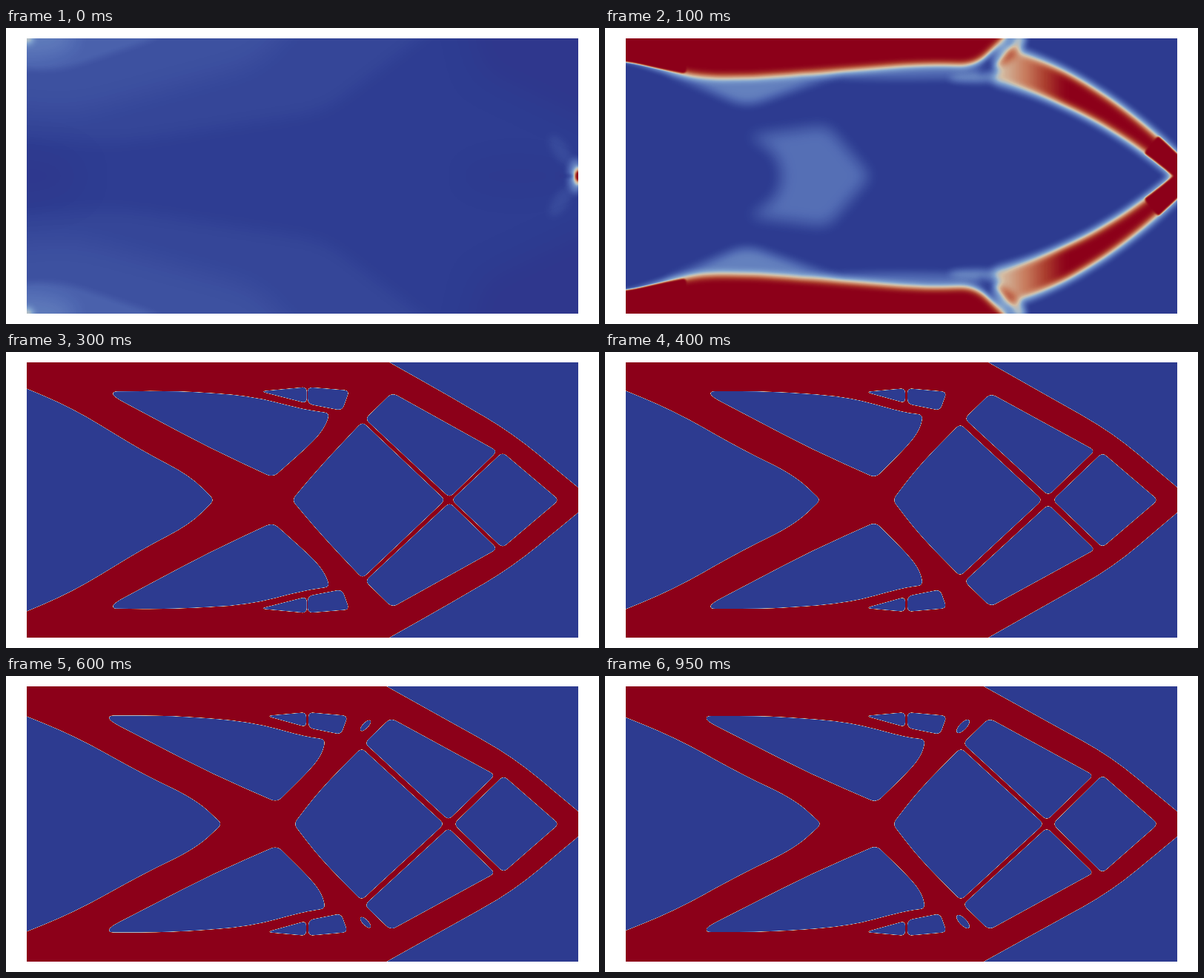
Animation of 800 by 400 pixels, one loop 1000 ms. Source, as an HTML page with a canvas:

```html
<!DOCTYPE html>
<html>
<head>
<meta charset="utf-8">
<style>
html, body { margin: 0; width: 100%; height: 100%; overflow: hidden; background: #fff; }
canvas { display: block; }
</style>
</head>
<body>
<canvas id="view" width="800" height="400"></canvas>
<script>
// A grey density field is drawn, softened and then coloured through a palette.
const view = document.getElementById('view').getContext('2d');
const fieldCanvas = document.createElement('canvas');
fieldCanvas.width = 800;
fieldCanvas.height = 400;
const field = fieldCanvas.getContext('2d', { willReadFrequently: true });
const SOLID = '#fff', VOID = '#080808', DARK = '#000';

const mix = (a, b, k) => a + (b - a) * k;
const clamp = v => Math.min(1, Math.max(0, v));
const easeOut = v => 1 - (1 - clamp(v)) ** 2;

const stops = [
  [0, 47, 54, 140], [.04, 45, 60, 145], [.2, 80, 105, 178], [.4, 125, 158, 205],
  [.5, 172, 188, 200], [.6, 212, 190, 165], [.75, 200, 125, 95], [.88, 170, 60, 45], [1, 140, 0, 25]
];
const palette = Array.from({ length: 256 }, (_, i) => {
  const v = i / 255;
  const n = Math.max(1, stops.findIndex(s => s[0] >= v));
  const a = stops[n - 1], b = stops[n], k = (v - a[0]) / (b[0] - a[0]);
  return [1, 2, 3].map(c => mix(a[c], b[c], k));
});

// Corners of the holes in the upper half: early, settled, and the slow drift afterwards.
const hole = (early, settled, drift = () => [0, 0]) => ({ early, settled, drift });
const leftNotch = hole(
  [[10,33], [82,65], [180,139], [228,170], [251,200]],
  [[10,45], [92,79], [187,133], [255,166], [291,200]],
  (x, y) => [1, (200 - y) / 37]);
const triangle = hole(
  [[149,54], [225,51], [322,51], [400,66], [460,76], [448,88], [432,106], [345,168], [262,124], [152,62]],
  [[142,53], [225,53], [330,61], [400,81], [429,85], [425,104], [410,125], [365,170], [280,132], [143,60]],
  x => [1 + (x - 360) / 33, 1]);
const slots = [
  hole([[318,51], [408,42], [408,70]], [[352,54], [405,49], [405,69]]),
  hole([[404,43], [470,46], [458,79], [404,70]], [[408,49], [461,54], [452,79], [408,70]])
];
const diamond = hole(
  [[379,200], [427,155], [486,86], [600,200]],
  [[388,200], [424,153], [479,97], [590,200]],
  x => [(x - 388) / 100, 0]);
const quad = hole(
  [[483,92], [523,52], [668,137], [600,205]],
  [[485,90], [520,56], [661,133], [598,194]],
  () => [-2, 1]);
const kite = hole(
  [[592,200], [666,134], [746,200]],
  [[604,200], [671,136], [746,200]],
  (x, y) => [0, (y - 200) / 30]);
const corner = hole(
  [[505,7], [600,59], [680,113], [772,184], [790,198], [790,5]],
  [[505,7], [600,61], [685,109], [772,183], [790,198], [790,5]],
  x => [Math.min(0, (x - 772) / 42), 0]);
const holes = [leftNotch, triangle, ...slots, diamond, quad, kite, corner];

function brush(color, alpha, blur) {
  field.fillStyle = field.strokeStyle = color;
  field.globalAlpha = alpha;
  field.filter = blur ? `blur(${blur}px)` : 'none';
}

// Rounded outline: the straighter the bend, the longer its curve.
function trace(pts) {
  const n = pts.length;
  pts.forEach((p, i) => {
    const [a, b] = [pts[(i + n - 1) % n], pts[(i + 1) % n]].map(q => [q[0] - p[0], q[1] - p[1]]);
    const la = Math.hypot(...a), lb = Math.hypot(...b);
    const straight = Math.max(0, -(a[0] * b[0] + a[1] * b[1]) / (la * lb));
    const cut = 7 + 40 * straight ** 3;
    const ka = Math.min(cut / la, .5), kb = Math.min(cut / lb, .5);
    field.lineTo(p[0] + a[0] * ka, p[1] + a[1] * ka);
    field.quadraticCurveTo(...p, p[0] + b[0] * kb, p[1] + b[1] * kb);
  });
  field.closePath();
}

// Outlines ending on the axis join their reflection, others get a twin.
function shape(pts, color, alpha, blur) {
  const twin = pts.filter(p => p[1] !== 200).map(([x, y]) => [x, 400 - y]).reverse();
  const joined = pts[pts.length - 1][1] === 200;
  brush(color, alpha, blur);
  for (const outline of joined ? [pts.concat(twin)] : [pts, twin]) {
    field.beginPath();
    trace(outline);
    field.fill();
  }
}

function spot(x, y, rx, ry, alpha, blur, angle = 0, color = SOLID) {
  brush(color, alpha, blur);
  for (const s of y === 200 ? [1] : [1, -1]) {
    field.beginPath();
    field.ellipse(x, 200 + s * (y - 200), rx, ry, s * angle, 0, 7);
    field.fill();
  }
}

// Tapered arm along a quadratic curve, from parameter t0 to the tip.
function arm(t0, color, blur) {
  const upper = [], lower = [];
  for (let i = 0; i <= 12; i++) {
    const t = mix(t0, 1, i / 12), half = mix(27, 12, t);
    const x = mix(mix(530, 665, t), mix(665, 785, t), t);
    const y = mix(mix(48, 85, t), mix(85, 200, t), t);
    const angle = Math.atan2(mix(37, 115, t), mix(135, 120, t));
    const dx = half * Math.sin(angle), dy = half * Math.cos(angle);
    upper.push([x + dx, y - dy]);
    lower.unshift([x - dx, y + dy]);
  }
  shape([...upper, ...lower], color, 1, blur);
}

function clear(color) {
  brush(color, 1, 0);
  field.fillRect(0, 0, 800, 400);
}

function drawStart() {
  clear('#0b0b0b');
  shape([[620,-30], [640,60], [830,150], [830,-30]], DARK, .8, 18);
  spot(28, 200, 70, 35, .6, 18, 0, DARK);
  spot(690, 200, 70, 25, .3, 12, 0, DARK);
  shape([[-40,145], [150,158], [430,115], [580,0], [580,-40], [-40,-40]], SOLID, .035, 12);
  shape([[-40,105], [90,118], [340,50], [420,-40], [-40,-40]], SOLID, .045, 18);
  shape([[-20,50], [65,60], [210,12], [240,-20], [-20,-20]], SOLID, .07, 4);
  spot(28, 14, 65, 26, .11, 12);
  spot(28, 14, 9, 8, .4, 4);
  spot(748, 165, 10, 24, .06, 6, -.6);
  spot(769, 200, 10, 23, .3, 5);
  spot(772, 200, 7, 13, .5, 2.5);
  spot(755, 200, 11, 3, .6, 2, 0, DARK);
  spot(773, 200, 5, 7, 1, 1.5);
}

function drawSpread(soft) {
  clear(VOID);
  shape([[80,58], [190,106], [320,60]], SOLID, .27, 7 * soft);
  spot(400, 60, 130, 9, .2, 6 * soft);
  spot(500, 68, 36, 6, .25, 5 * soft);
  shape([[242,200], [228,165], [192,146], [300,132], [358,200]], SOLID, .2, 10 * soft);
  shape([[-20,36], [28,38], [110,67], [200,68], [430,50], [500,52], [550,5], [550,-30], [-20,-30]], SOLID, 1, 5.5 * soft);
  shape([[-20,43], [28,45], [72,55], [110,62], [110,-10], [-20,-10]], SOLID, 1, soft);
  spot(545, 30, 30, 12, .5, 4 * soft, -.8);
  const fade = field.createLinearGradient(525, 0, 620, 0);
  fade.addColorStop(0, 'rgba(255,255,255,.55)');
  fade.addColorStop(1, SOLID);
  arm(0, fade, 6 * soft);
  arm(.8, SOLID, 1.2 * soft);
  spot(528, 39, 34, 6, .4, 3 * soft, -.8, VOID);
}

// Short-lived leftovers of the coarse layout.
function drawLeftovers(fade) {
  spot(649, 155, 12, 9, fade, 1);
  spot(628, 167, 8, 3, .75 * fade, 1.5, -.5);
  spot(664, 143, 3, 6, .45 * fade, 1.5, .4);
  spot(587, 200, 4, 11, .3 * fade, 1.5);
  spot(549, 144, 12, 4, .65 * fade, 2);
  for (let i = 1; i < 4; i++) spot(549 + 13 * i, 144 - 17 * i, 4 + i, 3, .15 * (i + 1) * fade, 1.5, -.4);
  spot(345, 56, 34, 4, .65 * fade, 3, .05);
  spot(372, 66, 20, 7, .2 * fade, 4, .15);
  spot(352, 157, 20, 6, .7 * fade, 3, -.5);
  spot(447, 88, 17, 4, .6 * fade, 3, -.9);
  spot(465, 58, 3, 9, .6 * fade, 2, .2);
  spot(383, 200, 3, 13, .5 * fade, 2);
  spot(251, 174, 10, 4, .25 * fade, 2, .65, VOID);
}

function drawTruss(t) {
  const form = easeOut((t - 200) / 200), settle = easeOut((t - 400) / 550);
  const blur = t < 200 ? 5 : mix(.8, .55, form);
  clear(SOLID);
  for (const { early, settled, drift } of holes) {
    const pts = early.map(([x, y], i) => {
      const [sx, sy] = settled[i], [dx, dy] = drift(sx, sy);
      return [mix(x, sx, form) + dx * settle, sy === 200 ? 200 : mix(y, sy, form) + dy * settle];
    });
    shape(pts, VOID, 1, blur);
  }
  if (t < 290) drawLeftovers(1 - clamp((t - 200) / 90));
  // small slot that opens late
  if (t > 450) {
    const grow = clamp((t - 450) / 150), late = clamp((t - 600) / 350);
    const half = 4 + 5.5 * grow + 2 * late;
    spot(485 - 2 * late, 67 + late, half, (3.7 + late) * grow, 1, blur, -.8, VOID);
  }
}

function render(t) {
  if (t < 50) drawStart();
  else if (t < 150) drawSpread(t < 100 ? 2.4 : 1);
  else drawTruss(t);
  const img = field.getImageData(28, 14, 744, 372), d = img.data;
  for (let i = 0; i < d.length; i += 4) {
    [d[i], d[i + 1], d[i + 2]] = palette[d[i]];
    d[i + 3] = 255;
  }
  view.putImageData(img, 28, 14);
}

let shown = -1;
function tick() {
  const step = Math.floor(performance.now() % 1000 / 50);
  if (step !== shown) render((shown = step) * 50);
  requestAnimationFrame(tick);
}
tick();
</script>
</body>
</html>
```
